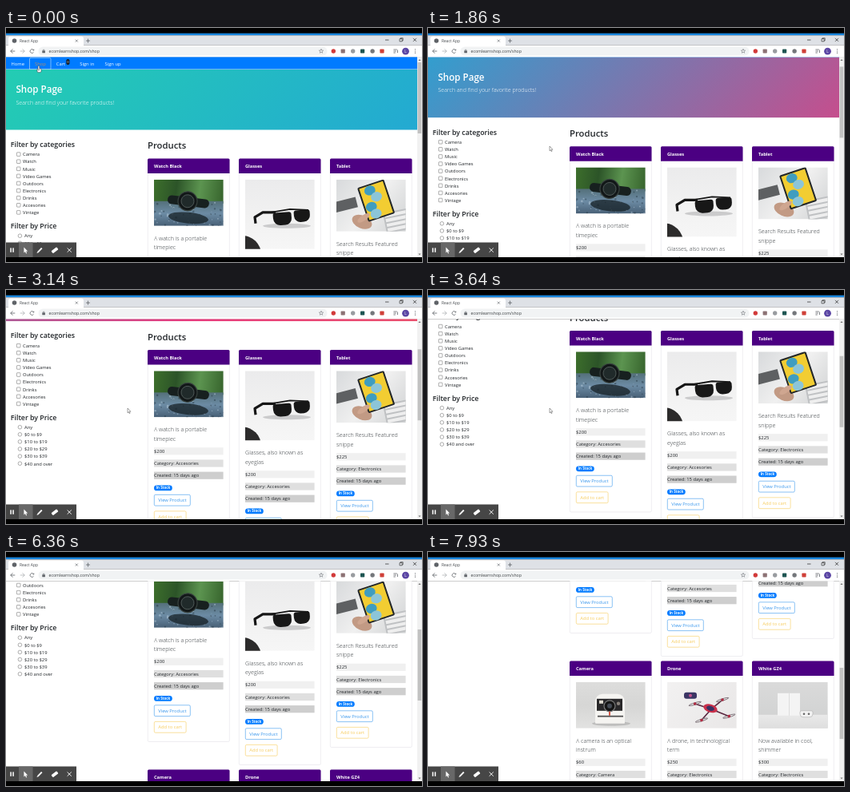
Recreate the animation shown at these times as an HTML page with a canvas. Size 520 by 293 pixels, loop 8000 ms.

```html
<!DOCTYPE html>
<html lang="en">
<head>
<meta charset="utf-8">
<title>Shop page</title>
<style>
html, body { margin: 0; width: 100%; height: 100%; overflow: hidden; background: #000; }
canvas { display: block; width: 520px; height: 293px; }
</style>
</head>
<body>
<canvas id="stage"></canvas>
<script>
const canvas = document.getElementById('stage');
const c = canvas.getContext('2d');
const ratio = window.devicePixelRatio || 1;
canvas.width = 520 * ratio;
canvas.height = 293 * ratio;

const LOOP = 8000;
const BLUE = '#007bff', INDIGO = '#4b0082', INK = '#212529', GREY = '#5f6368';
const CATEGORIES = ['Camera', 'Watch', 'Music', 'Video Games', 'Outdoors', 'Electronics', 'Drinks', 'Accesories', 'Vintage'];
const PRICES = ['Any', ...[0, 10, 20, 30].map(n => `$${n} to $${n + 9}`), '$40 and over'];

// ---- time ----
const clamp = x => Math.min(1, Math.max(0, x));
const ramp = (t, from, to) => clamp((t - from) / (to - from));

// CSS "ease": cubic-bezier(.25, .1, .25, 1)
function ease(x) {
  const curve = (a, b, u) => 3 * a * u * (1 - u) ** 2 + 3 * b * u * u * (1 - u) + u ** 3;
  let lo = 0, hi = 1;
  for (let i = 0; i < 24; i++) {
    const mid = (lo + hi) / 2;
    if (curve(.25, .25, mid) < x) lo = mid; else hi = mid;
  }
  return curve(.1, 1, lo);
}

// a quick start, a steady scroll, a small nudge, then a second steady scroll
const scrollAt = t => 15.3 * ramp(t, 1715, 1860) + 45.7 * ramp(t, 1860, 2570) +
  77 * ramp(t, 2570, 4170) + 15 * ramp(t, 4340, 4860) + 136 * ramp(t, 6640, 7930);

// ---- drawing helpers ----
function text(str, x, y, size, color = INK, weight = 400, align = 'left') {
  c.font = `${weight} ${size}px "Open Sans", "Noto Sans", sans-serif`;
  c.fillStyle = color;
  c.textAlign = align;
  c.fillText(str, x, y + size * .36);
}

function rect(x, y, w, h, color) {
  c.fillStyle = color;
  c.fillRect(x, y, w, h);
}

function paint(fill, stroke, lw) {
  if (fill) { c.fillStyle = fill; c.fill(); }
  if (stroke) { c.strokeStyle = stroke; c.lineWidth = lw; c.stroke(); }
}

function round(x, y, w, h, r, fill, stroke, lw = .6) {
  c.beginPath();
  c.roundRect(x, y, w, h, r);
  paint(fill, stroke, lw);
}

function oval(x, y, rx, ry, fill, stroke, lw = .6) {
  c.beginPath();
  c.ellipse(x, y, rx, ry, 0, 0, 7);
  paint(fill, stroke, lw);
}

const dot = (x, y, r, fill, stroke, lw) => oval(x, y, r, r, fill, stroke, lw);

function path(pts, fill, stroke, lw = .8) {
  c.beginPath();
  for (let i = 0; i < pts.length; i += 2) c.lineTo(pts[i], pts[i + 1]);
  if (fill) c.closePath();
  paint(fill, stroke, lw);
}

function cross(x, y, r, color, lw = .7) {
  path([x - r, y - r, x + r, y + r], null, color, lw);
  path([x + r, y - r, x - r, y + r], null, color, lw);
}

function at(x, y, turn, paintPart) {
  c.save();
  c.translate(x, y);
  c.rotate(turn);
  paintPart();
  c.restore();
}

function blend(x0, y0, x1, y1, ...colors) {
  const g = c.createLinearGradient(x0, y0, x1, y1);
  colors.forEach((col, i) => g.addColorStop(i / (colors.length - 1), col));
  return g;
}

function seeded(seed) {
  return () => (seed = seed * 16807 % 2147483647) / 2147483647;
}

// ---- product pictures, each in its own 87px wide box ----
function watch() {
  const rnd = seeded(11);
  rect(0, 0, 87, 30, blend(0, 0, 87, 12, '#3d6f2c', '#2c5428', '#5c9450', '#39672f'));
  rect(0, 27, 87, 31, blend(0, 27, 0, 58, '#54707a', '#6c8ba4', '#486076'));
  for (let i = 0; i < 70; i++) {
    dot(rnd() * 87, 29 + rnd() * 29, .4 + rnd(), i % 2 ? 'rgba(205,222,235,.4)' : 'rgba(25,40,50,.4)');
  }
  at(43, 48, .1, () => oval(0, 0, 25, 7, 'rgba(22,32,38,.75)'));
  at(42, 27, .12, () => {
    round(-25, -5, 52, 11, 5, '#17201f');
    dot(0, 0, 12, '#121718', '#38423f', 1.2);
    dot(0, 0, 8, '#202a2a', '#6d7a76');
  });
}

function glasses() {
  rect(0, 0, 87, 87, blend(0, 0, 0, 87, '#ebebec', '#f1f1f1', '#f6f6f6'));
  dot(-4, 94, 24, '#2c2b2b');
  oval(52, 58, 30, 3, 'rgba(110,110,112,.3)');
  c.lineJoin = 'round';
  path([13, 55, 12, 47, 22, 41, 38, 41], null, '#161616', 3.2);
  path([32, 41, 56, 37, 79, 38], null, '#161616', 1.8);
  at(47, 49, -.08, () => round(-12, -8, 23, 16, [3, 3, 8, 9], '#171717'));
  at(71, 46, -.08, () => round(-10, -8, 20, 15, [3, 3, 8, 8], '#171717'));
  c.lineJoin = 'miter';
}

function tablet() {
  rect(0, 0, 87, 65, blend(0, 0, 87, 65, '#d8dadc', '#f0f0f0', '#cfd1d2'));
  at(8, 33, -.25, () => rect(-14, -7, 32, 13, '#5e6062'));
  at(74, 51, -.2, () => {
    rect(-14, -12, 32, 26, '#bfc1c3');
    for (let i = 0; i < 4; i++) rect(-12, -10 + i * 6, 28, 4, '#eeeeee');
  });
  at(32, 53, .4, () => oval(0, 0, 13, 8, '#c29a84'));
  at(49, 26, -.32, () => {
    round(-17, -22, 35, 45, 2, '#222628');
    rect(-15, -20, 31, 41, '#f2cd32');
    for (let i = 0; i < 4; i++) oval(-3 + 6 * Math.sin(i * 2), -14 + i * 10, 7, 6, i % 2 ? '#8cc5d8' : '#3f9dc0');
  });
  at(34, 48, -.6, () => oval(0, 0, 9, 3.5, '#cfa690'));
}

function camera() {
  rect(0, 0, 87, 58, blend(0, 0, 0, 58, '#dddddc', '#d6d6d5', '#e2e2e1'));
  oval(44, 52, 24, 3, 'rgba(90,90,90,.25)');
  round(24, 15, 37, 37, [9, 9, 1, 1], '#f5f4f1');
  rect(26, 21, 32, 15, '#29282a');
  dot(42, 30, 7, '#151515', '#777', 1.2);
  dot(42, 30, 3, '#454b55');
  rect(29, 23, 5, 4, '#ded9cf');
  dot(53, 27, 2.2, '#88817b');
  rect(27, 42, 32, 1.8, '#555');
  rect(41, 37, 2, 5, '#d65a48');
}

function drone() {
  rect(0, 0, 87, 58, blend(0, 0, 87, 58, '#f2f1f1', '#e9e7e7'));
  round(21, 13, 16, 8, 3, '#3b3564');
  dot(29, 17, 2, '#c1518c');
  for (let i = 0; i < 4; i++) {
    const a = .55 + i * Math.PI / 2;
    const x = 56 + 25 * Math.cos(a), y = 35 + 15 * Math.sin(a);
    path([55, 34, x, y], null, '#5a2740', 1.6);
    at(x, y, -.3, () => oval(0, 0, 8, 1.2, null, '#7c7178', .9));
    dot(x, y, 1.8, '#b12c43');
  }
  at(54, 33, .3, () => {
    oval(0, 0, 9, 5, '#c9304a');
    oval(0, 0, 5, 3, '#393263');
  });
}

function gameBox() {
  rect(0, 0, 87, 58, blend(0, 0, 0, 42, '#dadada', '#d2d3d3'));
  rect(0, 41, 87, 17, blend(0, 41, 0, 58, '#e9e9e9', '#dedede'));
  rect(24, 14, 28, 28, '#f4f4f4');
  rect(38, 14, .6, 28, '#ccc');
  round(52, 36, 16, 8, [2, 2, 4, 4], '#f3f3f3', '#a9a9a9');
  dot(57, 40, 1.3, '#666');
  dot(63, 40, 1.3, '#666');
}

const CARDS = [
  ['Watch Black', watch, 58, ['A watch is a portable', 'timepiec'], '$200', 'Accesories'],
  ['Glasses', glasses, 87, ['Glasses, also known as', 'eyeglas'], '$200', 'Accesories'],
  ['Tablet', tablet, 65, ['Search Results Featured', 'snippe'], '$225', 'Electronics'],
  ['Camera', camera, 58, ['A camera is an optical', 'instrum'], '$60', 'Camera'],
  ['Drone', drone, 58, ['A drone, in technological', 'term'], '$250', 'Electronics'],
  ['White GZ4', gameBox, 58, ['Now available in cool,', 'shimmer'], '$300', 'Electronics']
];

// ---- page ----
function button(label, x, y, w, color) {
  round(x, y, w, 13.8, 1.5, null, color, .6);
  text(label, x + 5, y + 7, 5.8, color);
}

function card([title, photo, h, lines, price, category], i) {
  const x = 177 + 114 * (i % 3), y = 163.6 + 262 * Math.floor(i / 3);
  const left = x + 8, top = y + 26.2, end = top + h;
  round(x + .3, y, 102, end + 142.7 - y, 1.5, '#fff', '#dddbe3', .5);
  round(x, y, 102.5, 18.4, [1.5, 1.5, 0, 0], INDIGO);
  text(title, left, y + 9.5, 5.7, '#fff', 700);

  c.save();
  c.translate(left, top);
  c.beginPath();
  c.rect(0, 0, 86.6, h);
  c.clip();
  photo();
  c.restore();

  lines.forEach((line, n) => text(line, left, end + 15.5 + n * 11.4, 7.1, '#33383c', 300));
  [price, 'Category: ' + category, 'Created: 15 days ago'].forEach((line, n) => {
    const mid = end + 42.5 + n * 15.2, shade = 240 - n * 17;
    rect(left, mid - 4.6, 86.6, 9.2, `rgb(${shade},${shade},${shade})`);
    text(line, left, mid, 5.8);
  });
  round(left, end + 85.2, 22.8, 6.8, 3.4, BLUE);
  text('In Stock', left + 11.4, end + 88.5, 4.4, '#fff', 700, 'center');
  button('View Product', left + .3, end + 97, 45, '#3a97ec');
  button('Add to cart', left + .3, end + 117.6, 39.8, '#f6cb5c');
}

function banner(t) {
  const w = 514, h = 75.5, W = w * 4, H = h * 4;
  const x = -ease((t + 250) / 7500) * (W - w), y = 52 - (H - h) / 2;
  const cx = x + W / 2, cy = y + H / 2, q = (W + H) / 4;
  rect(0, 52, w, h, blend(cx + q, cy + q, cx - q, cy - q, '#ee7752', '#e73c7e', '#23a6d5', '#23d5ab'));
  text('Shop Page', 12.5, 77, 11.6, '#fff', 600);
  text('Search and find your favorite products!', 12.5, 93, 7.05, '#fff', 300);
}

function nav(hover) {
  rect(0, 36, 514, 16, BLUE);
  rect(0, 51.4, 514, .6, '#b9dcf4');
  if (hover) round(29.5, 37.3, 26.5, 14.5, [1.5, 1.5, 0, 0], null, '#cfe3f5');
  text('Home', 6.5, 44.5, 5.8, '#fff');
  text('Shop', 36, 44.5, 5.8, hover ? '#b98a63' : '#ff9900');
  text('Cart', 62.8, 44.5, 5.8, '#fff');
  round(75.3, 39, 4.2, 7, 2, '#101820');
  text('0', 77.4, 42.5, 4.2, '#fff', 400, 'center');
  text('Sign in', 92.3, 44.5, 5.8, '#fff');
  text('Sign up', 123.5, 44.5, 5.8, '#fff');
}

function filters() {
  text('Filter by categories', 5.8, 145.7, 8.8, INK, 600);
  CATEGORIES.forEach((name, i) => {
    const y = 158.3 + i * 9.1;
    round(13.4, y - 2.5, 4.6, 4.6, .6, '#fff', '#777');
    text(name, 21, y, 5.8);
  });
  text('Filter by Price', 5.8, 248, 8.8, INK, 600);
  PRICES.forEach((name, i) => {
    const y = 260.4 + i * 9.1;
    dot(17.4, y - .2, 2.3, '#fff', '#777');
    text(name, 23, y, 5.8);
  });
}

function page(t, scroll) {
  c.save();
  c.beginPath();
  c.rect(0, 36.2, 520, 250.8);
  c.clip();
  rect(0, 36, 520, 251, '#fff');
  c.translate(0, -scroll);
  nav(t < 250);
  banner(t);
  filters();
  text('Products', 177, 147.3, 11.3, INK, 600);
  CARDS.forEach(card);
  c.restore();

  rect(514, 36.2, 6, 250.8, '#f1f1f1');
  rect(514.6, 43 + scroll * .353, 4.6, 89, '#c1c1c1');
  path([515.4, 41, 517, 39, 518.6, 41], '#777');
  path([515.4, 282.5, 517, 284.5, 518.6, 282.5], '#777');
}

// ---- window ----
function tabStrip() {
  rect(0, 0, 520, 6.6, '#000');
  rect(0, 6.6, 520, 2.6, '#1a86dc');
  rect(0, 9.2, 520, 12.4, '#dee1e6');
  round(3, 10.6, 94, 11.5, [3, 3, 0, 0], '#fff');
  dot(10.5, 16, 2.8, GREY);
  text('React App', 17, 16, 4.9, '#45494d');
  cross(88.3, 16, 1.5, GREY);
  path([100, 16, 105, 16], null, GREY);
  path([102.5, 13.5, 102.5, 18.5], null, GREY);
  path([474, 15, 478.5, 15], null, '#222', .7);
  round(493, 12.6, 3.2, 3.2, 0, null, '#222');
  round(492, 13.6, 3.2, 3.2, 0, '#dee1e6', '#222');
  cross(511, 14.8, 2, '#222');
}

function arrow(x, dir, color) {
  path([x - 2.8 * dir, 29, x + 2.8 * dir, 29], null, color);
  path([x, 26.4, x - 2.8 * dir, 29, x, 31.6], null, color);
}

function star(x, y, size) {
  c.beginPath();
  for (let i = 0; i < 10; i++) {
    const a = (i / 5 - .5) * Math.PI, r = i % 2 ? size * .43 : size;
    c.lineTo(x + r * Math.cos(a), y + r * Math.sin(a));
  }
  c.closePath();
  paint(null, GREY, .5);
}

function toolbar() {
  rect(0, 21.5, 520, 14.7, '#fff');
  round(40.5, 23.6, 361, 11, 5.5, '#f1f3f4');
  arrow(8.5, 1, GREY);
  arrow(20.5, -1, '#aeb1b4');
  c.beginPath();
  c.arc(32.5, 29, 2.4, .5, 5.6);
  paint(null, GREY, .8);
  path([33.2, 28.2, 35.2, 28.2, 35.2, 26.2], GREY);
  round(45.3, 28.4, 3.6, 2.8, .3, GREY);
  dot(47.1, 28.2, 1.1, null, GREY);
  text('ecomlearnshop.com/shop', 53.5, 29, 5.2, '#3c4043');
  star(394, 29, 2.8);

  ['#d23a3a', '#8c7274', '#999ca0', '#1e5552', '#74777b', '#cf4038'].forEach((color, i) =>
    i % 2 ? round(418.6 + 12.2 * (i - 1), 26.4, 5.2, 5.2, .8, color) : dot(409.3 + 12.2 * i, 29, 2.7, color));
  for (let i = 0; i < 3; i++) {
    rect(484.4, 26.6 + 2 * i, 4.4 - i, .8, GREY);
    dot(511.5, 26.8 + 2.2 * i, .6, GREY);
  }
  rect(489.2, 27.5, .8, 3.6, GREY);
  dot(499.5, 29.2, 4.4, '#5b46a4');
  text('L', 499.5, 29.2, 4.6, '#fff', 400, 'center');
}

function recorderBar() {
  rect(0, 268.5, 88, 18.5, '#464646');
  rect(16, 268.5, 17.5, 18.5, '#686868');
  rect(5.3, 275.4, 1.5, 5.4, '#fff');
  rect(8.3, 275.4, 1.5, 5.4, '#fff');
  at(22.4, 274.5, 0, () => arrowHead(1.2, '#fff'));
  at(42, 278.5, -.8, () => {
    rect(-3, -1, 7, 2, '#fff');
    path([-3, -1, -5, 0, -3, 1], '#fff');
  });
  at(61, 278.3, -.65, () => round(-4.3, -1.9, 8.6, 3.8, 1, '#fff'));
  cross(79.2, 278.1, 2.6, '#fff', .9);
}

function arrowHead(size, fill, stroke) {
  c.scale(size, size);
  path([0, 0, 0, 5.8, 1.3, 4.6, 2.2, 6.6, 3.1, 6.2, 2.2, 4.3, 3.9, 4.2], fill, stroke, .5);
}

function hand() {
  round(-2, 2.6, 5, 5, 1.5, '#fff', '#333', .5);
  round(-1, -.8, 1.8, 6, .9, '#fff', '#333', .5);
}

function pointer(t) {
  if (t > 3700) return;
  const k = ramp(t, 60, 950), x = 41 + 111 * k, y = 48 + 100 * k;
  at(x, y, 0, () => y < 52 ? hand() : arrowHead(1, '#fff', '#444'));
}

function draw(now) {
  const t = now % LOOP;
  c.setTransform(ratio, 0, 0, ratio, 0, 0);
  rect(0, 0, 520, 293, '#000');
  page(t, scrollAt(t));
  tabStrip();
  toolbar();
  recorderBar();
  pointer(t);
}

const start = performance.now();
function tick() {
  draw(performance.now() - start);
  requestAnimationFrame(tick);
}
tick();
</script>
</body>
</html>
```
